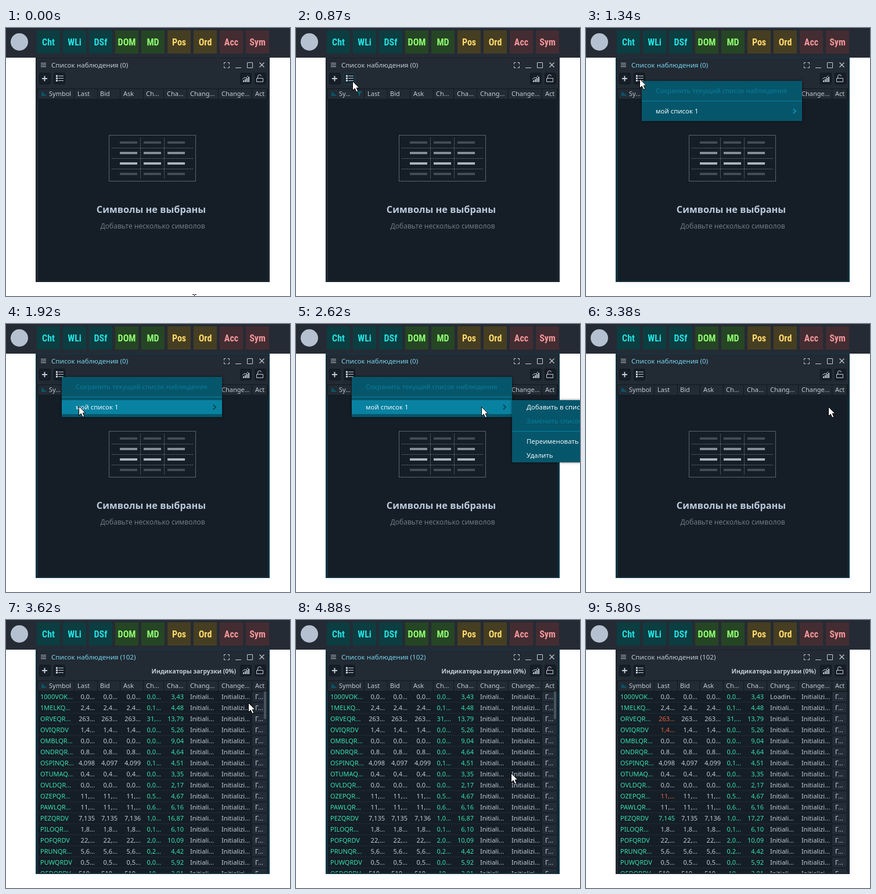
These frames come from a looping animation (489 px wide and 461 px high, 5880 ms). An HTML page with a canvas:

```html
<!DOCTYPE html>
<html lang="ru">
<head>
<meta charset="utf-8">
<style>
html, body { margin: 0; width: 100%; height: 100%; overflow: hidden; background: #fff; }
canvas { display: block; }
</style>
</head>
<body>
<canvas id="stage" width="489" height="461"></canvas>
<script>
const ctx = document.getElementById('stage').getContext('2d');
const LOOP = 5880;
const LIGHT = '#c3ccd7', GREEN = '#38e2ae', RED = '#e8623c', TEAL = '#06566b';

// [start, end, steps, x, y]: the pointer reaches x, y in even time steps, slowing down
const moves = [
  [60, 140, 2, 268, 238], [370, 950, 9, 92, 87], [1550, 1920, 6, 125, 141],
  [2480, 2840, 6, 415, 142], [2990, 2990, 1, 417, 142], [4750, 5205, 7, 303, 433]
];

const tabs = [
  ['Cht', 0], ['WLi', 0], ['DSf', 0], ['DOM', 1], ['MD', 1],
  ['Pos', 2], ['Ord', 2], ['Acc', 3], ['Sym', 3]
];
const tabColors = [['#0c3d41', '#26dfe0'], ['#264524', '#8dfb70'], ['#463e22', '#ffda6b'], ['#432d32', '#f3979c']];

const headers = [['Last', 123], ['Bid', 162], ['Ask', 202], ['Ch...', 241], ['Cha...', 277],
  ['Chang...', 317], ['Change...', 371], ['Act', 429]];
const dividers = [117, 157, 196, 236, 271, 311, 365, 423, 449];

// symbol, last/bid/ask, change, change in percent
const rows = `1000VOK... 0,0... 0,0... 3,43
1MELKQ... 2,4... 0,1... 4,48
ORVEQR... 263... 31,... 13,79
OVIQRDV 1,4... 0,0... 5,26
OMBLQR... 0,0... 0,0... 9,04
ONDRQR... 0,8... 0,0... 4,64
OSPINQR... 4,098/4,097/4,099 0,1... 4,51
OTUMAQ... 0,4... 0,0... 3,35
OVLDQR... 0,0... 0,0... 2,17
OZEPQR... 11,... 0,5... 4,67
PAWLQR... 11,... 0,6... 6,16
PEZQRDV 7,135/7,135/7,136 1,0... 16,87
PILOQR... 1,8... 0,1... 6,10
POFQRDV 22,... 2,0... 10,09
PRUNQR... 5,6... 0,2... 4,42
PUWQRDV 0,5... 0,0... 5,92
QEDQRDV 510... 10... 2,01`.split('\n').map(line => line.split(' '));

function rect(x, y, w, h, color) {
  ctx.fillStyle = color;
  ctx.fillRect(x, y, w, h);
}

function text(str, x, y, color = LIGHT, size = 11, weight = 400, align = 'left') {
  ctx.font = `${weight} ${size}px "Noto Sans", sans-serif`;
  ctx.textAlign = align;
  ctx.fillStyle = color;
  ctx.fillText(str, x, y);
}

function stroke(d, color = LIGHT, width = 1, dash = []) {
  ctx.strokeStyle = color;
  ctx.lineWidth = width;
  ctx.setLineDash(dash);
  ctx.stroke(new Path2D(d));
  ctx.setLineDash([]);
}

function fill(d, color) {
  ctx.fillStyle = color;
  ctx.fill(new Path2D(d));
}

function pointerAt(t) {
  let x = 324, y = 460;
  for (const [start, end, steps, toX, toY] of moves) {
    if (t < start) break;
    const interval = (end - start) / Math.max(1, steps - 1);
    const step = interval ? Math.min(steps, Math.floor((t - start + 8) / interval) + 1) : steps;
    const p = 1 - (1 - step / steps) ** 1.6;
    x += (toX - x) * p;
    y += (toY - y) * p;
  }
  return [Math.round(x), Math.round(y)];
}

function drawTopBar() {
  rect(0, 0, 489, 51, '#252b34');
  ctx.fillStyle = '#b5c1d0';
  ctx.beginPath();
  ctx.arc(23, 24, 15, 0, Math.PI * 2);
  ctx.fill();
  tabs.forEach(([label, group], i) => {
    const [back, front] = tabColors[group], x = 53 + i * 45;
    rect(x, 4, 40, 40, back);
    ctx.font = '900 condensed 16px "Roboto Condensed", Roboto, sans-serif';
    ctx.textAlign = 'center';
    ctx.fillStyle = front;
    ctx.fillText(label, x + 20, 30);
  });
}

function toolButton(x, hover) {
  ctx.beginPath();
  ctx.roundRect(x + .5, 77.5, 19, 19, 2);
  ctx.fillStyle = hover ? '#182630' : '#161e27';
  ctx.fill();
  ctx.strokeStyle = hover ? '#0f4454' : '#10171e';
  ctx.lineWidth = 1;
  ctx.stroke();
}

function drawWindow(t) {
  const active = t >= 1050 && t < 5800;
  const loaded = t >= 3460;
  rect(51, 51, 403, 386, active ? '#053f50' : '#18222b');
  rect(52, 52, 401, 384, '#222a33');
  rect(55, 123, 396, 312, '#151e27');
  if (active) stroke('M53.5 123V435M451.5 123V435', '#073849');

  text(`Список наблюдения (${loaded ? 102 : 0})`, 78, 68, active ? '#78d5ef' : LIGHT, 11.6);
  drawTools(t);
  if (t >= 3620) text('Индикаторы загрузки (0%)', 396, 92, LIGHT, 10.3, 700, 'right');

  drawHeader(t >= 730 && t < 3380);
  if (loaded) drawTable(t);
  else drawPlaceholder();
}

function drawTools(t) {
  stroke('M60 60.5h9M60 63.5h9M60 66.5h9');
  stroke('M375.5 62.5v-3h3M381.5 59.5h3v3M384.5 65.5v3h-3M378.5 68.5h-3v-3M395 68.5h10M415.5 59.5h9v9h-9z');
  stroke('M436.5 59.5l8 8M444.5 59.5l-8 8', LIGHT, 1.2);

  toolButton(57);
  toolButton(82, t >= 870 && t < 1260);
  toolButton(403);
  toolButton(428);
  stroke('M62 87h9M66.5 82.5v9', LIGHT, 2);
  for (const y of [82.5, 86.5, 90.5]) {
    stroke(`M86 ${y}h3`, LIGHT, 3);
    stroke(`M90 ${y}h9`);
  }
  stroke('M409 93v-3M412 93v-5M415 93v-7M418 93v-9', LIGHT, 2);
  stroke('M407 88l4-3 2 1 4-4');
  stroke('M431.5 86.5h11v6h-11zM433.5 86v-2a3 3 0 0 1 6-1');
}

function drawHeader(filtered) {
  rect(54, 104, 397, 19, '#10181f');
  rect(55, 105, 395, 17, '#222a33');
  for (const x of dividers) rect(x, 105, 1, 17, '#10181f');
  fill('M61 109v8h10z', '#0b5368');
  text(filtered ? 'Sy...' : 'Symbol', 74, 117);
  if (filtered) fill('M104 109h10l-4 4v4h-2v-4z', '#0b5f76');
  for (const [label, x] of headers) text(label, x, 117);
}

function drawPlaceholder() {
  stroke('M177.5 184.5h149v79h-149z', '#7d8791', 1, [2, 1]);
  stroke('M182 206.5h140M182 224.5h140M182 242.5h140M231.5 189v70M272.5 189v70', '#5b656f', 1, [2, 1]);
  ['#434c55', '#858e98', '#a9b2bc', '#434c55'].forEach((color, i) => {
    for (const x of [196, 237, 278]) rect(x, 195 + i * 18, 30, 4, color);
  });
  text('Символы не выбраны', 250, 318, '#bccadb', 16.3, 600, 'center');
  text('Добавьте несколько символов', 252.5, 345, '#707a84', 12, 400, 'center');
}

function drawTable(t) {
  const updated = t >= 5340;
  const right = (str, x, y, color) => text(str, x, y, color, 11, 400, 'right');
  ctx.save();
  ctx.beginPath();
  ctx.rect(55, 123, 396, 312);
  ctx.clip();
  rows.forEach(([symbol, prices, change, percent], i) => {
    const top = 123 + i * 19, y = top + 13;
    rect(55, top + 18, 396, 1, '#202a33');
    rect(424, top + 1, 25, 16, '#242d37');
    text('Г...', 429, y);
    if (t < 3620) return;
    const [last, bid = last, ask = last] = prices.split('/');
    const rising = updated && i === 11;
    const falling = updated && [2, 3, 9].includes(i);
    text(symbol, 59, y, GREEN);
    right(rising ? '7,145' : last, 153, y, rising ? GREEN : falling ? RED : LIGHT);
    right(bid, 192, y);
    right(ask, 232, y);
    right(change, 267, y, GREEN);
    right(rising ? '17,27' : percent, 306, y, GREEN);
    text(updated && i === 0 ? 'Loadin...' : 'Initiali...', 317, y);
    text('Initializi...', 371, y);
  });
  if (!updated) rect(444, 123, 4, 47, '#4a545e');
  ctx.restore();
}

function panel(x, y, w, h, alpha) {
  ctx.globalAlpha = alpha;
  ctx.shadowColor = 'rgba(0,0,0,.6)';
  ctx.shadowBlur = 4;
  rect(x, y, w, h, TEAL);
  ctx.shadowBlur = 0;
}

function drawMenus(t, [x, y]) {
  const disabled = '#0b7c99', highlight = '#0982a1';
  const item = (str, left, base, color = '#f2f7fa') => text(str, left, base, color, 11.4, 500);

  if (t >= 1260 && t < 3300) {
    const hover = t < 3220 && y >= 131;
    panel(96, 91, 276, 69, t < 1340 ? .5 : 1);
    item('Сохранить текущий список наблюдения', 120, 112, disabled);
    rect(96, 125, 276, 1, highlight);
    if (hover) rect(96, 131, 276, 24, highlight);
    item('мой список 1', 120, 147);
    stroke('M357 139l4 4-4 4', hover ? '#06485b' : '#0c8fb0', 2);
  }
  if (t >= 2090 && t < 3220) {
    panel(372, 131, 140, 107, Math.min(1, (Math.floor((t - 2090) / 80) + 1) / 3));
    if (x >= 372) rect(372, 131, 140, 24, highlight);
    item('Добавить в список', 397, 147);
    item('Заменить список', 397, 171, disabled);
    rect(372, 184, 140, 1, highlight);
    item('Переименовать', 397, 206);
    item('Удалить', 397, 230);
  }
  ctx.globalAlpha = 1;
}

function drawPointer(t, [x, y]) {
  if (t >= 5280) return;
  if (t < 60) {
    stroke('M321 458.5h3M325 458.5h3M324.5 459v2', '#000');
    return;
  }
  ctx.save();
  ctx.translate(x, y);
  const arrow = 'M.5 .5V16.5L4.2 13L7 19L9.8 17.8L7.2 12H11.8Z';
  fill(arrow, '#fff');
  stroke(arrow, '#000');
  ctx.restore();
}

function draw() {
  const t = performance.now() % LOOP;
  const pointer = pointerAt(t);
  rect(0, 0, 489, 461, '#fff');
  drawTopBar();
  drawWindow(t);
  drawMenus(t, pointer);
  drawPointer(t, pointer);
  requestAnimationFrame(draw);
}
draw();
</script>
</body>
</html>
```
